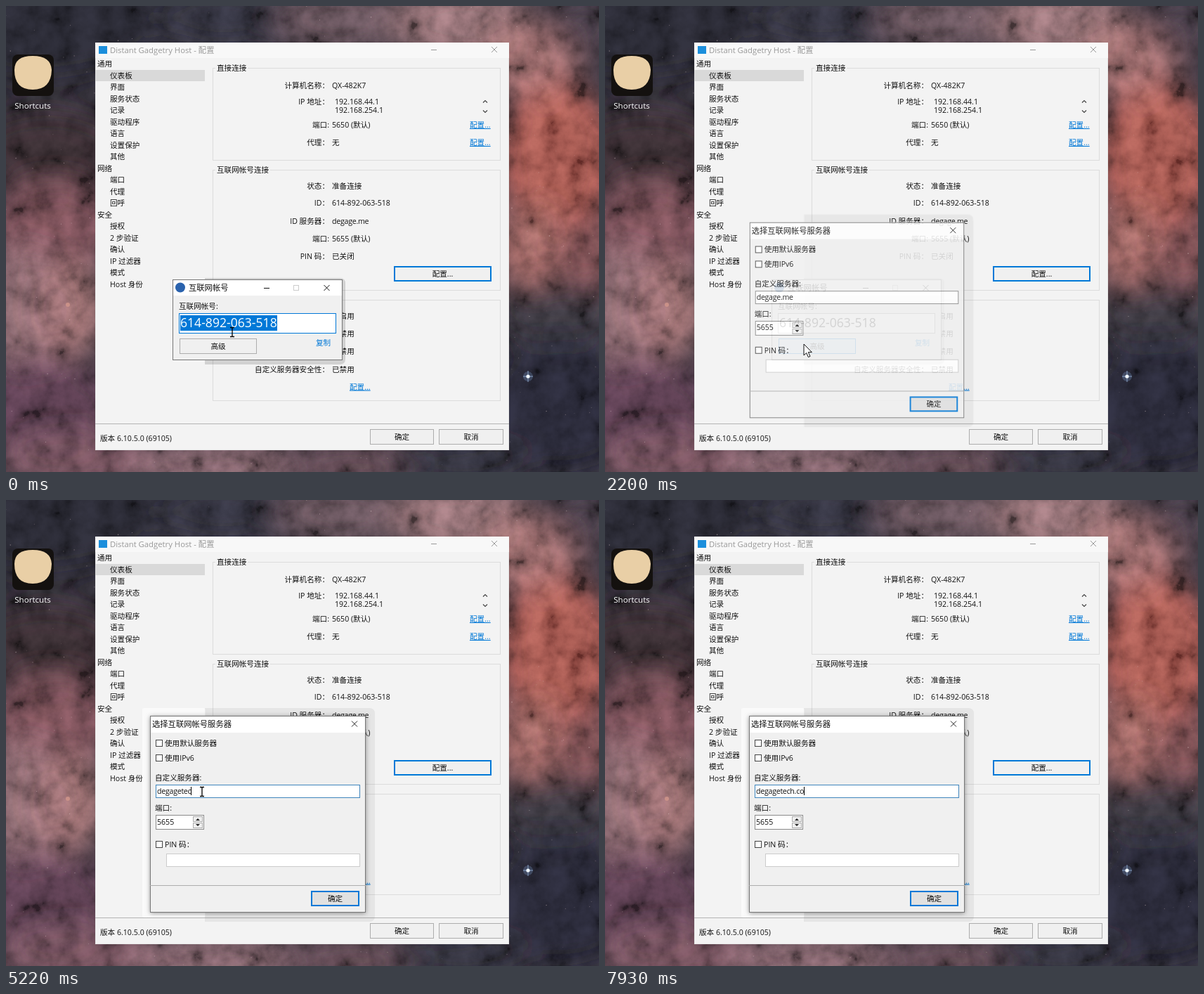
An HTML page that plays this animation: 844 by 663 pixels, repeating every 8 s.

```html
<!DOCTYPE html>
<html lang="zh-CN">
<head>
<meta charset="utf-8">
<style>
  html, body { margin: 0; width: 100%; height: 100%; overflow: hidden; background: #25252f; }
  svg { position: absolute; left: 0; top: 0; width: 844px; height: 663px; }
  #sky { will-change: transform; }
  text {
    font: 10.6px "Open Sans", "Noto Sans CJK SC", "Noto Sans CJK", sans-serif;
    fill: #111; white-space: pre;
  }
  .title { font-size: 11.3px; }
  .big { font-size: 17.6px; }
  .name { font-size: 11.6px; fill: #fff; }
  .link { fill: #0078d7; }
  .tight { letter-spacing: -.25px; }
  .under { text-decoration: underline; }
  .off { fill: #999; }
  .shade { mix-blend-mode: multiply; }
  .grain { mix-blend-mode: overlay; }
</style>
</head>
<body>
<svg id="sky" viewBox="0 0 844 663" xmlns="http://www.w3.org/2000/svg"></svg>
<svg id="stage" viewBox="0 0 844 663" xmlns="http://www.w3.org/2000/svg"></svg>
<script>
const LOOP = 8000;
const BLUE = '#0078d7', FACE = '#f3f3f3', GREY = '#adadad', LINE = '#dcdcdc';
const ACCOUNT = '614-892-063-518';
const $ = id => document.getElementById(id);

// Drawing helpers: rectangles by edges, text by vertical centre.
const box = (l, t, r, b, fill, stroke, w = 1, more = '') => {
  const h = stroke ? w / 2 : 0;
  return `<rect x="${l + h}" y="${t + h}" width="${r - l - 2 * h}" height="${b - t - 2 * h}" ` +
    `fill="${fill}" ${stroke ? `stroke="${stroke}" stroke-width="${w}"` : ''} ${more}/>`;
};
const text = (x, y, s, cls = '', anchor = 'start', more = '') =>
  `<text x="${x}" y="${y + 4}" class="${cls}" text-anchor="${anchor}" ${more}>${s}</text>`;
const path = (d, stroke, w = 1, fill = 'none', more = '') =>
  `<path d="${d}" stroke="${stroke}" stroke-width="${w}" fill="${fill}" ${more}/>`;
const cross = (x, y, c) => path(`M${x - 4} ${y - 4}l8 8m0-8l-8 8`, c);
const dash = (x, y, c) => path(`M${x} ${y + .5}h8`, c);
const group = (id, s) => `<g id="${id}">${s}</g>`;
const button = (l, t, r, b, s, strong, fill = '#f0f0f0') =>
  box(l, t, r, b, fill, strong ? BLUE : GREY, strong ? 2 : 1) +
  text((l + r) / 2, (t + b) / 2, s, '', 'middle');
const row = (y, label, value, cls = '') =>
  text(460, y, label, '', 'end') + text(464, y, value, cls);
const more = (x, y) => text(x, y, '配置...', 'link under');

function sky() {
  const clouds = [
    [40, 20, 190, 90, '#24262f'], [60, 205, 110, 60, '#33292f'],
    [70, 310, 100, 60, '#6d474d'], [25, 430, 70, 90, '#7d5d62'],
    [95, 430, 50, 70, '#8a6263'], [50, 570, 110, 70, '#54394a'],
    [110, 650, 130, 45, '#654650'], [300, 655, 130, 40, '#7a5c64'],
    [500, 655, 110, 40, '#55424a'], [310, 15, 100, 50, '#2d2e38'],
    [480, 20, 100, 50, '#5c4b53'], [650, 25, 100, 60, '#866569'],
    [750, 80, 70, 60, '#8a5f5f'], [830, 25, 50, 45, '#40363f'],
    [785, 215, 80, 105, '#a0524a'], [745, 340, 50, 60, '#8f5b57'],
    [830, 350, 50, 55, '#70474a'], [780, 440, 100, 45, '#353039'],
    [790, 570, 120, 100, '#222531'], [650, 650, 100, 40, '#2f2d38']
  ];
  let seed = 11;
  const rnd = () => (seed = seed * 16807 % 2147483647) / 2147483647;
  let s = '<defs><filter id="soft" x="-20%" y="-20%" width="140%" height="140%">' +
    '<feGaussianBlur stdDeviation="20"/></filter>' +
    '<filter id="dust" x="0" y="0" width="100%" height="100%">' +
    '<feTurbulence type="fractalNoise" baseFrequency=".03" numOctaves="5" seed="4"/>' +
    '<feColorMatrix values="1.6 0 0 0 -.3 1.6 0 0 0 -.3 1.6 0 0 0 -.3 0 0 0 0 1"/></filter></defs>' +
    box(0, 0, 844, 663, '#2c2932') + '<g filter="url(#soft)">';
  for (const [x, y, rx, ry, c] of clouds)
    s += `<ellipse cx="${x}" cy="${y}" rx="${rx}" ry="${ry}" fill="${c}" opacity=".9"/>`;
  s += '</g>' + box(0, 0, 844, 663, '#888', '', 1, 'class="grain" filter="url(#dust)" opacity=".45"');
  for (let i = 0; i < 400; i++)
    s += `<circle cx="${(rnd() * 844).toFixed(1)}" cy="${(rnd() * 663).toFixed(1)}" ` +
      `r="${(.3 + rnd() * .5).toFixed(2)}" fill="#e0cbcc" opacity="${(.15 + rnd() * .4).toFixed(2)}"/>`;
  return s + '<circle cx="743" cy="527" r="7" fill="#8fb4e8" opacity=".25"/>' +
    path('M743 519v16m-7-8h14', '#a9c8f0', .7) +
    '<circle cx="743" cy="527" r="2.6" fill="#f2f8ff"/>' +
    '<circle cx="88" cy="425" r="3" fill="#e0a090" opacity=".6"/>';
}

const shortcut = () =>
  box(9, 69, 68, 128, '#14110f', '', 1, 'rx="8"') +
  path('M12 91Q12 71 38 71T65 91Q64 119 38 119T12 91Z', 'none', 0, '#e9cfa6') +
  text(38, 142, 'Shortcuts', 'name', 'middle');

function mainWindow() {
  const tree = ['通用', ' 仪表板', ' 界面', ' 服务状态', ' 记录', ' 驱动程序', ' 语言', ' 设置保护',
    ' 其他', '网络', ' 端口', ' 代理', ' 回呼', '安全', ' 授权', ' 2 步验证', ' 确认',
    ' IP 过滤器', ' 模式', ' Host 身份'];
  const frame = (t, b, s, w) => box(294, t, 704, b, 'none', LINE) +
    (s ? box(298, t - 5, 302 + w, t + 6, FACE) + text(300, t, s) : '');
  return box(127, 52, 716, 632, FACE, '#e6e6e6') +
    box(127, 52, 716, 74, '#f8f8f8') +
    box(132, 57, 144, 68, '#1c8fdc') +
    text(148, 62.5, 'Distant Gadgetry Host - 配置', 'title off') +
    dash(605, 62, '#999') + cross(695, 62, '#999') +
    box(127, 91, 283, 107, '#d9d9d9') +
    tree.map((s, i) => text(s[0] === ' ' ? 148 : 130, 82 + i * 16.5, s.trim())).join('') +
    frame(88, 220, '直接连接', 42) +
    row(113, '计算机名称：', 'QX-482K7') +
    row(135.5, 'IP 地址：', '') + text(468, 135.5, '192.168.44.1') + text(468, 148, '192.168.254.1') +
    path('M679 137.5l3-3l3 3M679 148.5l3 3l3-3', '#444', 1.2) +
    row(169, '端口:', '5650 (默认)') + more(660, 169) +
    row(194, '代理：', '无') + more(660, 194) +
    frame(233, 405, '互联网帐号连接', 74) +
    row(256, '状态：', '准备连接') +
    row(280, 'ID：', ACCOUNT) +
    row(305.5, 'ID 服务器：', 'degage.me', 'tight') +
    row(330.5, '端口:', '5655 (默认)') +
    row(356, 'PIN 码：', '已关闭') +
    button(552, 370, 691, 392, '配置...', true) +
    frame(418, 562) +
    row(441, '', '已启用') + row(466, '', '已禁用') + row(491, '', '已禁用') +
    row(516.5, '自定义服务器安全性：', '已禁用') + more(489, 541.5) +
    path('M127 594.5h589', '#b4b4b4') +
    text(134, 614.5, '版本 6.10.5.0 (69105)') +
    button(518, 602, 609, 624, '确定') + button(616, 602, 708, 624, '取消');
}

const accountWindow = () =>
  path('M283 387H475Q483 387 483 395V502Q483 510 475 510H283Z', 'none', 0, '#dcdcdc', 'class="shade"') +
  box(238, 390, 478, 503, '#f0f0f0') + box(238, 390, 478, 412, '#fff') +
  box(237, 389, 479, 504, 'none', '#777') +
  '<circle cx="248" cy="400.5" r="7" fill="#2a62ad"/>' +
  text(260, 401, '互联网帐号', 'title') +
  dash(367, 401, '#111') + box(409, 397, 417, 405, 'none', '#ccc') + cross(456.5, 401, '#111') +
  text(246, 427, '互联网帐号:') +
  box(246, 437, 470, 466, '#fff', BLUE, 1, 'id="edit"') +
  box(248, 440, 386, 462, BLUE, '', 1, 'id="mark"') +
  text(248, 453.3, ACCOUNT, 'big', 'start', 'id="number"') +
  box(247, 473, 357, 495, '#f0f0f0', GREY, 1, 'id="adv"') +
  text(302, 484, '高级', '', 'middle') + text(441, 479, '复制', 'link');

const menu = () =>
  box(249, 499, 446, 552, '#777', '', 1, 'opacity=".55"') +
  box(246, 496, 443, 550, '#f2f2f2', '#a8a8a8') +
  box(248, 497, 441, 514, '#91c9f7', '', 1, 'id="hot"') +
  ['关闭(X)', '获取新帐号(Y)', '选择互联网帐号服务器(Z)']
    .map((s, i) => text(272, 506 + i * 16.5, s)).join('');

// Lies outside the dialog group so that it tints the window below.
const dialogShade = () =>
  box(194, 296, 284, 594, '#fafafa', '', 1, 'rx="3" id="glow"') +
  path('M283 296H517Q525 296 525 304V592Q525 600 517 600H283Z', 'none', 0, '#f1f1f1',
    'class="shade" id="shade"') +
  box(205, 308, 512, 588, '#999', '', 1, 'class="shade" id="halo" filter="url(#blur)"');

function dialog() {
  const check = (y, s) => box(213, y - 5, 223, y + 5, '#fff', '#444') + text(226, y, s);
  return box(205, 307, 512, 587, '#f0f0f0') + box(205, 307, 512, 331, '#fff') +
    box(205, 307, 512, 587, 'none', '#777') +
    text(208, 319, '选择互联网帐号服务器', 'title') + cross(496, 318.5, '#222') +
    check(346, '使用默认服务器') + check(367, '使用IPv6') +
    text(212, 395, '自定义服务器:') +
    box(213, 405, 504, 424, '#fff', '#8a8a8a', 1, 'id="field"') +
    text(215, 414, '', 'tight', 'start', 'id="typed"') +
    box(0, 408, 1, 420, '#000', '', 1, 'id="caret"') +
    text(212, 437.5, '端口:') +
    box(213, 448, 282, 469, '#fff', '#8a8a8a') + text(215, 457.5, '5655') +
    box(266, 450, 280, 458, '#f0f0f0', GREY) + box(266, 459, 280, 467, '#f0f0f0', GREY) +
    path('M270 456l3-3l3 3ZM270 461l3 3l3-3Z', 'none', 0, '#222') +
    check(490, 'PIN 码：') + box(228, 503, 504, 522, '#fff', '#ccc') +
    path('M205 548.5h307', '#adadad') +
    button(434, 556, 503, 578, '确定', true, '#e1e1e1');
}

$('sky').innerHTML = sky();
$('stage').innerHTML =
  '<defs><filter id="blur"><feGaussianBlur stdDeviation="3"/></filter></defs>' +
  shortcut() + mainWindow() + accountWindow() +
  group('menu', menu()) + dialogShade() + group('dialog', dialog()) +
  group('arrow', path('M0 0V16L3.7 12.5L6.4 18.6L9 17.4L6.3 11.6H11.4Z', '#111', 1, '#fff')) +
  group('beam', path('M-3-6.5h2.2l.8.7l.8-.7h2.2M0-6V6M-3 6.5h2.2l.8-.7l.8.7h2.2', '#000', 1.3));

// Step tables: each entry holds from its time until the next one.
const pointer = [
  [0, 322, 464, 'beam'], [120, 320, 470, 'arrow'], [240, 318, 474, 'arrow'], [360, 316, 478, 'arrow'],
  [480, 314, 480, 'arrow'], [600, 313, 481, 'arrow'], [960, 312, 490, 'arrow'], [1080, 309, 503, 'arrow'],
  [1200, 306, 517, 'arrow'], [1330, 302, 529, 'arrow'], [1450, 300, 536, 'arrow'], [1820, 297, 521, 'arrow'],
  [1940, 291, 502, 'arrow'], [2060, 286, 488, 'arrow'], [2200, 283, 481, 'arrow'], [2350, 283, 478, 'arrow'],
  [2470, 282, 470, 'arrow'], [2590, 281, 458, 'arrow'], [2710, 280, 442, 'arrow'], [2840, 279, 420, 'beam'],
  [2960, 279, 415, 'beam'], [6220, 0, 0, '']
];
const adv = [
  [0, '#f0f0f0', GREY, 1], [240, '#e5f1fb', BLUE, 1], [600, '#cce4f7', '#2a6496', 2],
  [840, '#e1e1e1', BLUE, 2], [1820, '#d5e9f8', BLUE, 1]
];
const popup = [[0, 0, 0], [840, .6, -1], [960, 1, -1], [1080, 1, 0], [1200, 1, 1], [1330, 1, 2], [1570, 0, 2]];
const opening = [[0, 0, 1], [1820, .2, .95], [1940, .45, .97], [2060, .7, .985], [2200, .87, .995], [2350, 1, 1]];
const typing = [
  [0, 'degage.me'], [4090, 'degage.m'], [4210, 'degage.'], [4330, 'degage'], [4970, 'degagete'],
  [5220, 'degagetec'], [5350, 'degagetech'], [6220, 'degagetech.'], [6340, 'degagetech.c'],
  [6460, 'degagetech.ci'], [6610, 'degagetech.cin'], [7540, 'degagetech.ci'], [7660, 'degagetech.'],
  [7780, 'degagetech.c'], [7930, 'degagetech.co']
];
const blink = [
  [0, 0], [3320, 1], [3940, 0], [4090, 1], [4830, 0], [4970, 1], [5600, 0], [5720, 1], [7140, 0], [7540, 1]
];

const at = (table, t) => table.findLast(s => s[0] <= t).slice(1);
const set = (id, attrs) => {
  for (const k in attrs) $(id).setAttribute(k, attrs[k]);
};
const show = (id, on) => { $(id).style.display = on ? '' : 'none'; };

function draw(t) {
  const [x, y, shape] = at(pointer, t);
  for (const id of ['arrow', 'beam']) {
    show(id, id === shape);
    set(id, { transform: `translate(${x} ${y})` });
  }

  const [fill, stroke, w] = at(adv, t);
  set('adv', { fill, stroke, 'stroke-width': w });
  show('mark', t < 600);
  $('number').style.fill = t < 600 ? '#fff' : '#111';
  set('edit', { stroke: t < 840 ? BLUE : '#8a8a8a' });

  const [seen, hot] = at(popup, t);
  show('menu', seen > 0);
  show('hot', hot >= 0);
  set('menu', { opacity: seen });
  set('hot', { y: 497 + hot * 16.5 });

  const [alpha, k] = at(opening, t);
  for (const id of ['dialog', 'shade', 'halo']) {
    show(id, alpha > 0);
    set(id, {
      opacity: alpha,
      transform: `translate(358 446.5) scale(${k}) translate(-358 -446.5)`
    });
  }
  // Soft shadows must not darken what shows through while fading in.
  show('halo', alpha === 1);
  show('glow', alpha === 1);
  set('field', { stroke: t < 3200 ? '#8a8a8a' : '#3f86bd' });
  const [word] = at(typing, t);
  if ($('typed').textContent !== word) $('typed').textContent = word;
  if (alpha) set('caret', { x: Math.round(215 + $('typed').getComputedTextLength()) });
  show('caret', at(blink, t)[0]);
}

const start = performance.now();
function tick() {
  draw((performance.now() - start) % LOOP);
  requestAnimationFrame(tick);
}
tick();
</script>
</body>
</html>
```
